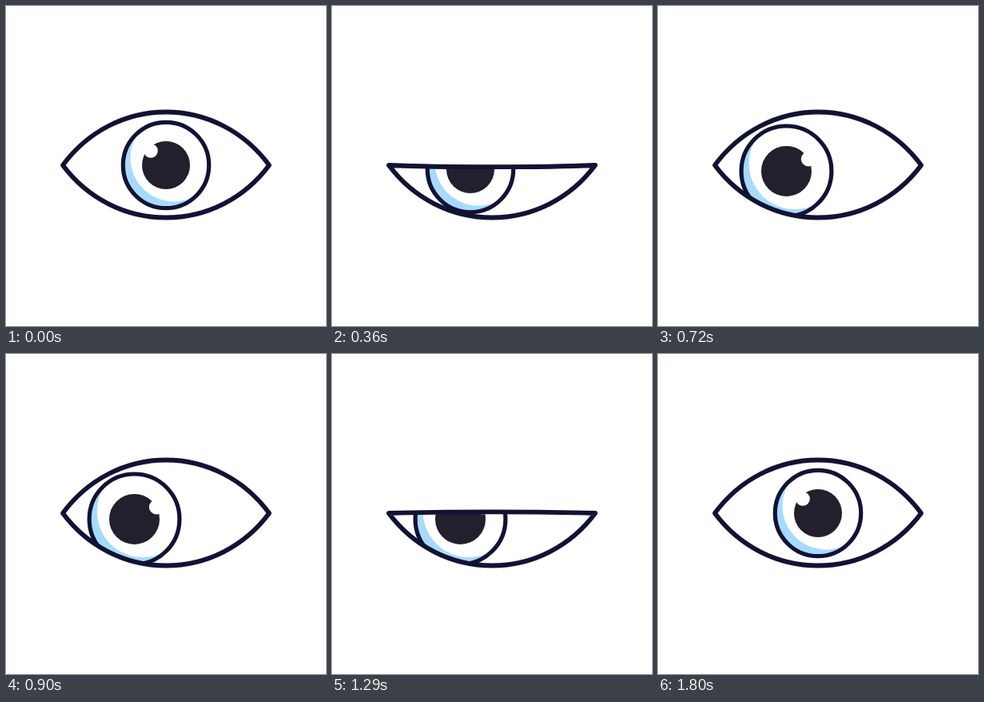
An HTML page that plays this animation: 400x400 px, repeating every 3.86 s.

```html
<!DOCTYPE html>
<html lang="en">
<head>
<meta charset="utf-8">
<title>Eye</title>
<style>
  html, body { margin: 0; width: 100%; height: 100%; overflow: hidden; background: #fff; }
  svg { display: block; width: 100vw; height: 100vh; }
  .line { fill: none; stroke: #121235; stroke-width: 5.2; stroke-linejoin: round; }
  #lids { stroke-width: 5.8; }
  #ring { vector-effect: non-scaling-stroke; }
</style>
</head>
<body>
<svg viewBox="0 0 400 400">
  <clipPath id="opening"><path id="mask"/></clipPath>
  <clipPath id="disc"><circle r="53"/></clipPath>
  <g clip-path="url(#opening)">
    <g id="iris">
      <g clip-path="url(#disc)">
        <circle r="53" fill="#a6dbfd"/>
        <circle cx="10" cy="-9" r="54.5" fill="#fff"/>
      </g>
      <circle r="30" fill="#231f2d"/>
      <circle id="glint" r="8.8" fill="#fff"/>
      <circle id="ring" class="line" r="53.7"/>
    </g>
  </g>
  <path id="lids" class="line"/>
</svg>
<script>
  const LOOP = 3860, STEP = 30, LAST = 1800;
  const MID = 199, OPEN = 66.5;
  const el = id => document.getElementById(id);
  const mix = (a, b, p) => a + (b - a) * p;

  // Eased value at time t from [time, value] keys.
  function track(keys, t) {
    if (t <= keys[0][0]) return keys[0][1];
    for (let i = 1; i < keys.length; i++) {
      const [t0, a] = keys[i - 1], [t1, b] = keys[i];
      if (t <= t1) {
        const u = (t - t0) / (t1 - t0);
        return mix(a, b, u * u * (3 - 2 * u));
      }
    }
    return keys[keys.length - 1][1];
  }

  const blink = start => [
    [start, OPEN], [start + 180, -3.6], [start + 330, -2.2],
    [start + 410, 70.5], [start + 540, OPEN]
  ];
  const lid = [...blink(30), ...blink(1140)];
  const gaze = [[210, 0], [450, 1], [1290, 1], [1545, 0]];
  const size = [[375, 1], [615, 1.05], [1290, 1.05], [1500, 1]];

  // Almond between the corners; h is the height of the upper lid.
  function almond(h) {
    const top = MID - h, topSide = MID - h * 0.63;
    const low = MID + 65.5, lowSide = MID + 41.5;
    return `M71 ${MID}C102 ${topSide} 149 ${top} 200 ${top}S298 ${topSide} 329 ${MID}` +
           `C298 ${lowSide} 251 ${low} 200 ${low}S102 ${lowSide} 71 ${MID}Z`;
  }

  function draw(now) {
    const t = Math.min(LAST, Math.floor((now % LOOP) / STEP) * STEP);
    const h = track(lid, t), g = track(gaze, t), s = track(size, t);
    el('lids').setAttribute('d', almond(h));
    el('mask').setAttribute('d', almond(Math.max(h, 0)));
    el('iris').setAttribute('transform',
      `translate(${mix(200, 160.5, g)} ${mix(199, 206.4, g)}) scale(${s})`);
    el('glint').setAttribute('cx', mix(-19, 26.3, g));
    el('glint').setAttribute('cy', mix(-18, -14.5, g));
  }

  const begin = performance.now();
  function tick() {
    draw(performance.now() - begin);
    requestAnimationFrame(tick);
  }
  tick();
</script>
</body>
</html>
```
